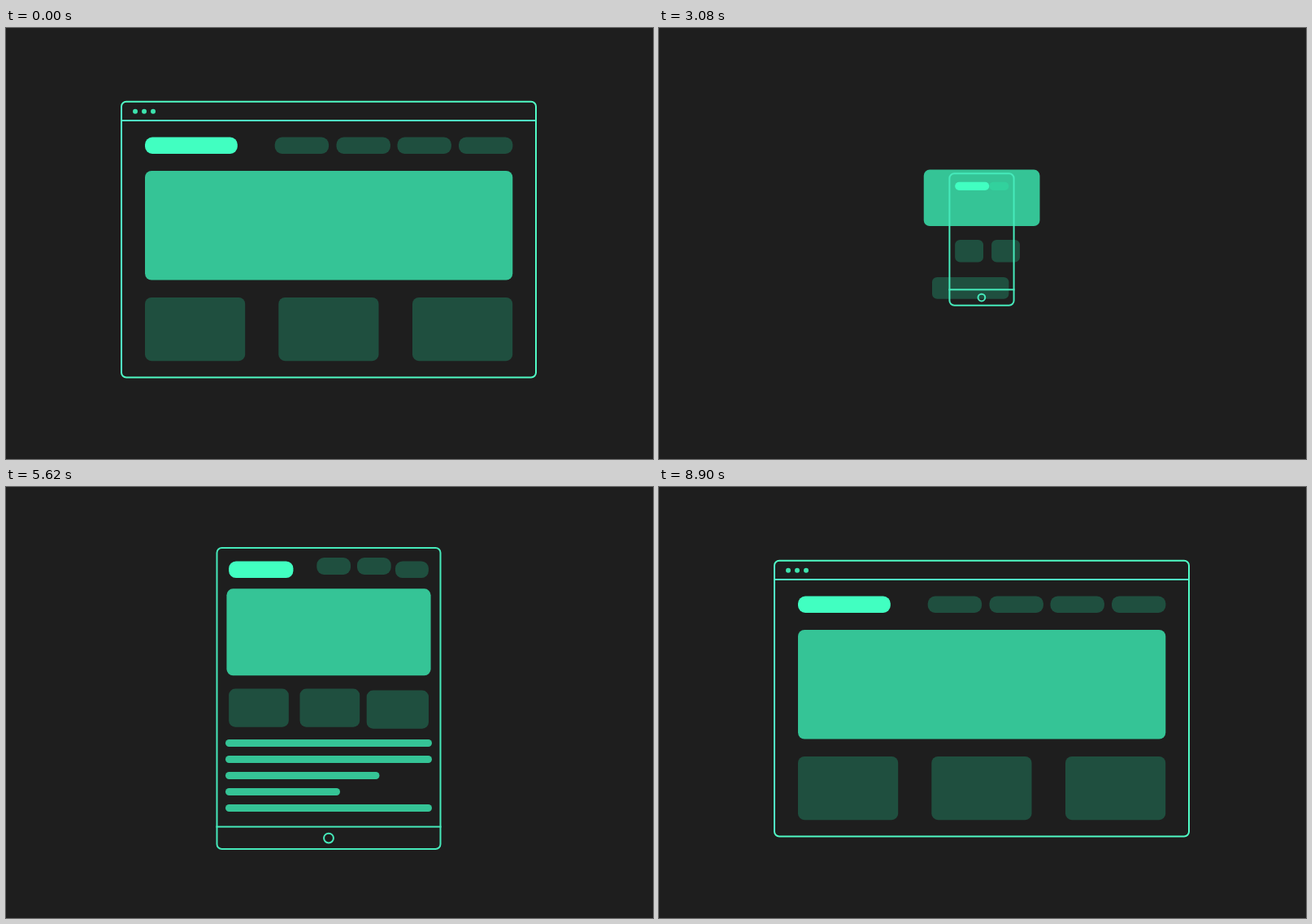
Write an HTML page with a canvas that moves like this. It is 796x531 px and loops after 8.92 s.

```html
<!DOCTYPE html>
<html lang="en">
<head>
<meta charset="utf-8">
<title>Responsive layout</title>
<style>
  html, body { margin: 0; width: 100%; height: 100%; overflow: hidden; background: #1e1e1e; }
  canvas { display: block; }
</style>
</head>
<body>
<canvas id="stage" width="796" height="531"></canvas>
<script>
const ctx = document.getElementById('stage').getContext('2d');
const LOOP = 8920;
const SPEED = 0.0175;   // spring phase, radians per ms
const HERO_LAG = 35;    // ms

// Fill tones as [colour, opacity].
const SOLID = ['#41ffc1', 1];
const MEDIUM = ['#3dfec0', 0.74];
const FAINT = ['#28ffb4', 0.22];
const DOT = ['#41ffc1', 0.88];

// Boxes are [x, y, width, height, radius].
const frames = {
  desktop: [141, 89.7, 512, 341.8, 7],
  tablet: [254, 69.2, 286, 382.6, 7],
  phone: [342.2, 163.1, 109.6, 194.8, 7]
};

const tablet = {
  hero: [270, 124, 254, 108, 8],
  logo: [270, 87, 81, 21, 9],
  pill: [482.3, 87, 41.7, 21, 9],
  cards: [270, 359.3, 448.6].map(x => [x, 248, 75.5, 48, 8]),
  bar: 423,
  home: [397, 437.2, 7]
};

const phone = {
  hero: [351, 197.5, 92.3, 52, 7],
  logo: [351.1, 175.5, 47.5, 11.7, 6],
  pill: [416.8, 175.5, 26.6, 11.7, 6],
  cards: [
    [351.1, 259.2, 40.5, 30.3, 6.5],
    [402.2, 259.2, 40.5, 30.3, 6.5],
    [351.6, 298.8, 91.8, 29.8, 6.5]
  ],
  bar: 336.3,
  home: [396.9, 346.6, 5.6]
};

const moves = [
  { start: 649, from: 'desktop', to: 'tablet' },
  { start: 2901, from: 'tablet', to: 'phone' },
  { start: 5231.6, from: 'phone', to: 'tablet' },
  { start: 7160, from: 'tablet', to: 'desktop' }
];

const clamp = v => Math.max(0, Math.min(1, v));
const lerp = (a, b, p) => a + (b - a) * p;
const mix = (a, b, p) => a.map((v, i) => lerp(v, b[i], p));

// Spring with a strong backward kick: dips below 0, overshoots, settles at 1.
function spring(ms) {
  const u = Math.max(0, ms) * SPEED;
  return 1 - Math.exp(-0.59 * u) * (Math.cos(u) + Math.tan(1.32) * Math.sin(u));
}

// Dissolve follows the spring up to its first peak, then stays complete.
const dissolve = ms => ms * SPEED > 3.9 ? 1 : clamp(spring(ms));

function box([x, y, w, h, r], [color, opacity], alpha = 1) {
  if (w <= 0 || h <= 0 || alpha <= 0) return;
  ctx.globalAlpha = opacity * alpha;
  ctx.fillStyle = color;
  ctx.beginPath();
  ctx.roundRect(x, y, w, h, Math.max(0, Math.min(r, w / 2, h / 2)));
  ctx.fill();
}

function outline([x, y, w, h, r], color) {
  if (w <= 2 || h <= 2) return;
  ctx.globalAlpha = 1;
  ctx.strokeStyle = color;
  ctx.beginPath();
  ctx.roundRect(x + 1, y + 1, w - 2, h - 2, Math.min(r - 1, w / 2 - 1, h / 2 - 1));
  ctx.stroke();
}

function divider(x, y, w, color, alpha) {
  if (w <= 0) return;
  ctx.globalAlpha = alpha;
  ctx.fillStyle = color;
  ctx.fillRect(x, y - 1, w, 2);
}

function homeButton([x, y, r], color, alpha) {
  if (r <= 1) return;
  ctx.globalAlpha = alpha;
  ctx.strokeStyle = color;
  ctx.beginPath();
  ctx.arc(x, y, r - 1, 0, 7);
  ctx.stroke();
}

const strokeColor = d =>
  `rgb(${mix([70, 234, 187], [80, 252, 198], d).map(Math.round).join()})`;

function drawDesktop(alpha) {
  if (alpha <= 0) return;
  box([171, 176, 452.3, 134.6, 8], MEDIUM, alpha);
  box([171, 134.5, 113.8, 20.5, 9], SOLID, alpha);
  for (const x of [330.7, 406.5, 481.5, 557]) box([x, 134.5, 66.4, 20.5, 9], FAINT, alpha);
  for (const x of [171, 335.3, 500]) box([x, 332, 123.2, 78.2, 8], FAINT, alpha);
  for (const x of [156, 167, 178]) box([x, 99.7, 6, 6, 3], DOT, alpha);
  divider(141, 114, 512, strokeColor(1), alpha);
}

function drawTabletExtras(alpha) {
  for (const x of [382.3, 432]) box([x, 87, 41.7, 21, 9], FAINT, alpha);
  [254, 254, 189.5, 141, 254].forEach((w, i) =>
    box([270, 311 + 20 * i, w, 9, 4.5], MEDIUM, alpha));
}

// Handheld layout: p = 0 is the tablet, p = 1 the phone.
function drawHandheld(p, heroP, extras, alpha) {
  if (alpha <= 0) return;
  const part = key => mix(tablet[key], phone[key], p);
  box(mix(tablet.hero, phone.hero, heroP), MEDIUM, alpha);
  box(part('logo'), SOLID, alpha);
  box(part('pill'), FAINT, alpha);
  tablet.cards.forEach((card, i) => box(mix(card, phone.cards[i], p), FAINT, alpha));
  drawTabletExtras(extras * alpha);
  const frame = mix(frames.tablet, frames.phone, p);
  const color = strokeColor(0);
  divider(frame[0], lerp(tablet.bar, phone.bar, p), frame[2], color, alpha);
  homeButton(part('home'), color, alpha);
}

function draw(time) {
  const move = moves.findLast(m => m.start <= time) || moves[3];
  const { from, to } = move;
  const ms = (time - move.start + LOOP) % LOOP;
  const p = spring(ms), fade = dissolve(ms);

  ctx.globalAlpha = 1;
  ctx.fillStyle = '#1e1e1e';
  ctx.fillRect(0, 0, 796, 531);
  ctx.lineWidth = 2;

  let desk = 0;
  if (from === 'phone' || to === 'phone') {
    const toPhone = v => to === 'phone' ? v : 1 - v;
    drawHandheld(toPhone(p), toPhone(spring(ms - HERO_LAG)), 1 - toPhone(fade), 1);
  } else {
    desk = to === 'desktop' ? fade : 1 - fade;
    drawDesktop(desk);
    drawHandheld(0, 0, 1, 1 - desk);
  }
  outline(mix(frames[from], frames[to], p), strokeColor(desk));
}

const began = performance.now();
function tick() {
  draw((performance.now() - began) % LOOP);
  requestAnimationFrame(tick);
}
tick();
</script>
</body>
</html>
```
